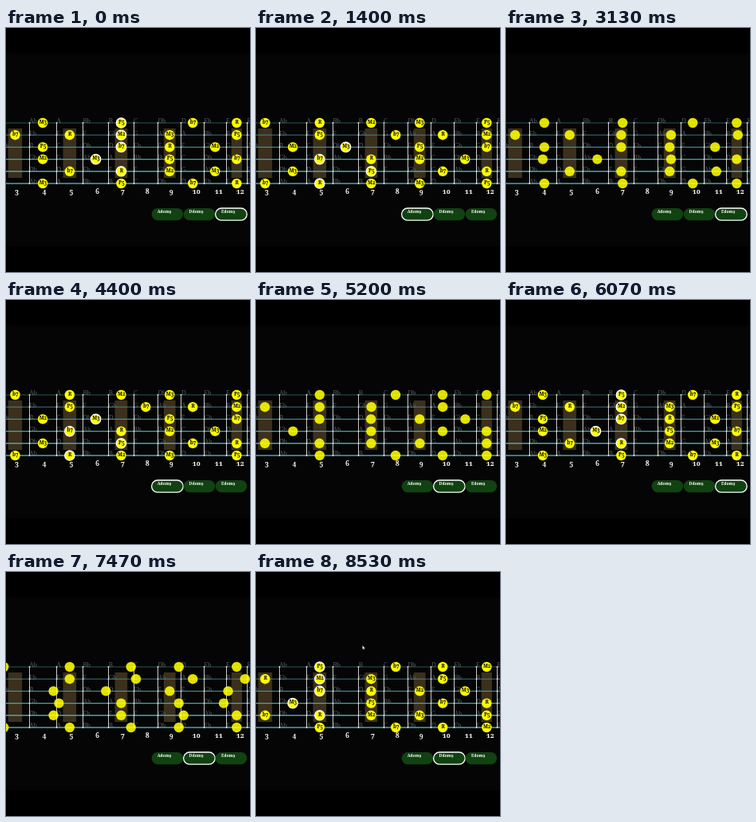
Recreate the animation shown at these times as an HTML page. Size 306 px wide and 306 px high, loop 8.59 s.

```html
<!DOCTYPE html>
<html lang="en">
<head>
<meta charset="utf-8">
<title>Dominant ninth fretboard</title>
<style>
  html, body { margin: 0; width: 100%; height: 100%; overflow: hidden; background: #000; }
  svg { display: block; width: 100%; height: 100%; }
  text { font-family: "Noto Serif", "DejaVu Serif", serif; font-weight: bold; font-variant-numeric: oldstyle-nums; fill: #fff; }
  .note { font-family: "Liberation Serif", "Times New Roman", serif; font-weight: normal; font-size: 8px; fill: #606060; }
  .num { font-size: 8.6px; }
  .degree { font-size: 6.2px; text-anchor: middle; fill: #000; }
  .name { font-size: 5px; text-anchor: middle; }
  .button { fill: #114211; stroke-width: 1.3; }
  .dot { fill: #ff0; stroke-width: 1.2; }
</style>
</head>
<body>
<svg id="stage" viewBox="0 0 306 306"></svg>
<script>
const LOOP = 8590, MOVE = 860;
const stage = document.getElementById('stage');
const NOTES = ['C', 'Db', 'D', 'Eb', 'E', 'F', 'Gb', 'G', 'Ab', 'A', 'Bb', 'B'];
const DEGREES = { 0: 'R', 2: 'M2', 4: 'M3', 7: 'P5', 10: 'b7' };
const OPEN = [4, 11, 7, 2, 9, 4];

// voices: pitches that lead into each other; shape: outlined fret per string
const CHORDS = {
  A: { root: 9, voices: [1, 4, 7, 9, 11], shape: [null, null, 6, 5, 7, 5] },
  D: { root: 2, voices: [2, 4, 6, 9, 12], shape: [5, 5, 5, 4, 5] },
  E: { root: 4, voices: [2, 4, 6, 8, 11], shape: [7, 7, 7, 6, 7] }
};
const CLICKS = [
  [-1000, 'E'], [535, 'A'], [1460, 'D'], [2528, 'E'], [3535, 'A'],
  [4440, 'D'], [5205, 'E'], [6385, 'A'], [7260, 'D']
];

const mod = n => ((n % 12) + 12) % 12;
const edge = fret => { const k = fret - 4; return 29 + 34.2 * k - 0.475 * k * (k - 1); };
const center = fret => (edge(fret) + edge(fret + 1)) / 2;
const stringY = s => 119 + s * 15.2;

function add(tag, attrs, text) {
  const el = document.createElementNS('http://www.w3.org/2000/svg', tag);
  for (const key in attrs) el.setAttribute(key, attrs[key]);
  if (text !== undefined) el.textContent = text;
  stage.appendChild(el);
  return el;
}

// cubic-bezier(.25, .1, .25, 1)
function ease(x) {
  if (x >= 1) return 1;
  let lo = 0, hi = 1;
  for (let i = 0; i < 24; i++) {
    const s = (lo + hi) / 2;
    if (0.75 * s * (1 - s) + s ** 3 < x) lo = s; else hi = s;
  }
  return 0.3 * lo * (1 - lo) ** 2 + 3 * lo * lo * (1 - lo) + lo ** 3;
}

function drawBoard() {
  add('rect', { y: 32, width: 306, height: 242, fill: '#050505' });
  for (const fret of [3, 5, 7, 9, 12]) {
    const w = (edge(fret + 1) - edge(fret)) / 2;
    add('rect', { x: center(fret) - w / 2, y: 126, width: w, height: 62, fill: '#3c301d' });
  }
  for (let s = 0; s < 6; s++) {
    for (let fret = 3; fret <= 13; fret++) {
      add('text', { x: edge(fret), y: stringY(s) + 0.3, class: 'note' }, NOTES[mod(OPEN[s] + fret)]);
    }
  }
  for (let s = 0; s < 6; s++) {
    add('line', { x1: 0, x2: 306, y1: stringY(s), y2: stringY(s), stroke: '#4da3ab', 'stroke-width': 0.5 + s * 0.24 });
  }
  for (let fret = 4; fret <= 13; fret++) {
    const x = Math.floor(edge(fret)) + 0.5;
    add('line', { x1: x, x2: x, y1: 118.5, y2: 195.5, stroke: '#c8c8c8' });
    for (let s = 0; s < 6; s++) add('circle', { cx: x, cy: stringY(s), r: 0.9, fill: '#e8e8e8' });
  }
  for (let fret = 3; fret <= 12; fret++) {
    add('text', { x: center(fret) - 0.5, y: 208.3, class: 'num' }, fret);
  }
}

function makeButtons() {
  return Object.keys(CHORDS).map((key, i) => {
    const x = 182.6 + i * 40;
    const box = add('rect', { x, y: 226, width: 39.6, height: 15.2, rx: 7.6, class: 'button' });
    add('text', { x: x + 16, y: 232.2, class: 'name' }, key + 'dom9');
    return { key, box };
  });
}

function makeDots() {
  const dots = [];
  for (let s = 0; s < 6; s++) {
    for (let voice = 0; voice < 5; voice++) {
      const base = mod(CHORDS.A.voices[voice] - OPEN[s]);
      for (const shift of [base - 12, base, base + 12]) {
        if (shift < -1 || shift > 15) continue;
        const offset = shift - CHORDS.A.voices[voice];
        dots.push({
          s, voice, offset,
          disc: add('circle', { cy: stringY(s), r: 6.2, class: 'dot' }),
          label: add('text', { y: stringY(s) + 0.8, class: 'degree' })
        });
      }
    }
  }
  return dots;
}

drawBoard();
const buttons = makeButtons();
const dots = makeDots();
const cursor = add('path', {
  d: 'M133.5 92.3v4.6l1.1-1 .8 1.7.8-.4-.8-1.6h1.5z', fill: '#fff', stroke: '#333', 'stroke-width': 0.3
});

function render(t) {
  let i = CLICKS.length - 1;
  while (CLICKS[i][0] > t) i--;
  const [start, key] = CLICKS[i];
  const to = CHORDS[key], from = CHORDS[CLICKS[Math.max(0, i - 1)][1]];
  const settled = t - start >= MOVE;
  const p = ease((t - start) / MOVE);

  for (const { s, voice, offset, disc, label } of dots) {
    const fret = to.voices[voice] + offset;
    const x0 = center(from.voices[voice] + offset);
    const x = x0 + (center(fret) - x0) * p;
    disc.setAttribute('cx', x);
    disc.setAttribute('fill-opacity', settled ? 1 : 0.88);
    disc.setAttribute('stroke', settled && to.shape[s] === fret ? '#fff' : 'none');
    label.setAttribute('x', x + 0.4);
    label.textContent = settled ? DEGREES[mod(to.voices[voice] - to.root)] : '';
  }
  for (const b of buttons) b.box.setAttribute('stroke', b.key === key ? '#fff' : 'none');
  cursor.setAttribute('visibility', t > 8460 ? 'visible' : 'hidden');
}

const begin = performance.now();
function tick() {
  render((performance.now() - begin) % LOOP);
  requestAnimationFrame(tick);
}
tick();
</script>
</body>
</html>
```
